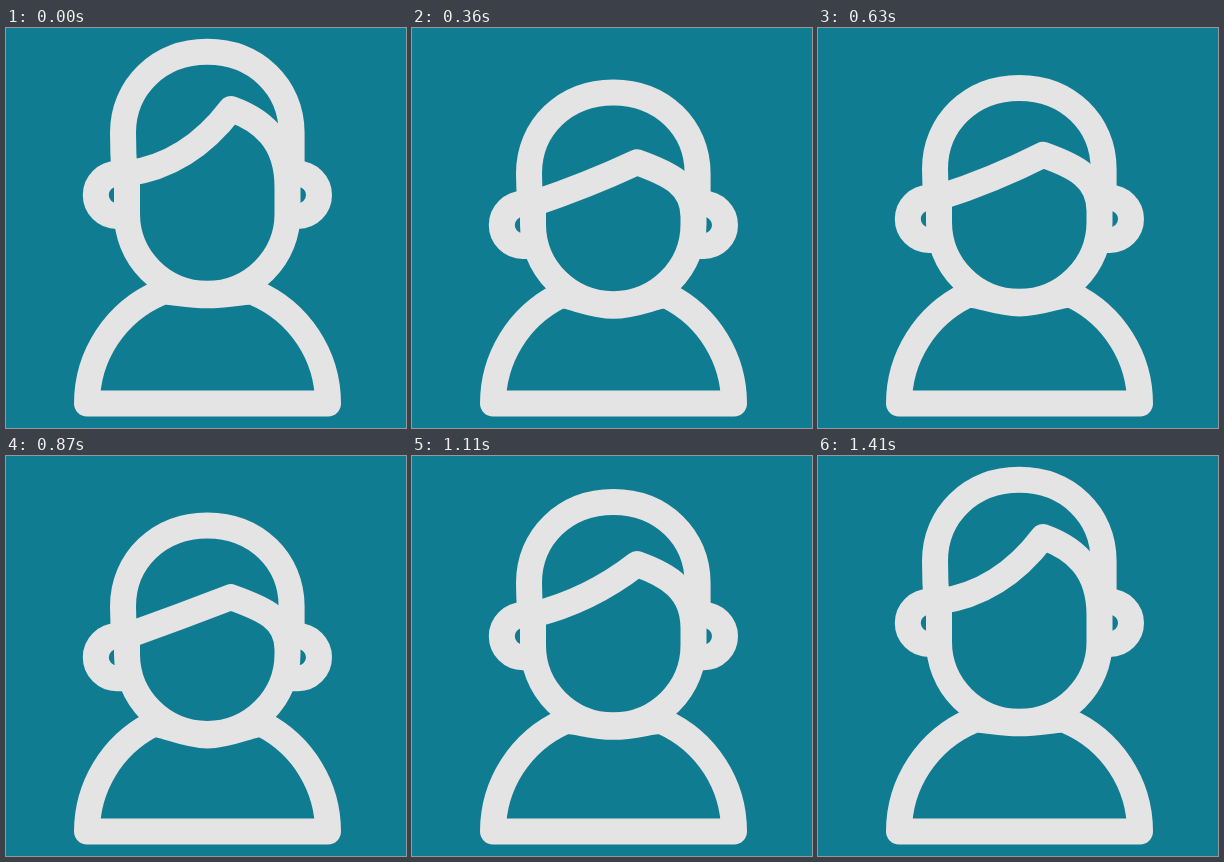
An HTML page that plays this animation: 400x400 px, repeating every 1560 ms.

```html
<!DOCTYPE html>
<html lang="en">
<head>
<meta charset="utf-8">
<title>Nodding avatar</title>
<style>
  html, body { margin: 0; width: 100%; height: 100%; overflow: hidden; background: #107c92; }
  svg { display: block; width: 100%; height: 100%; }
  path { fill: none; stroke: #e4e4e4; stroke-width: 26; stroke-linejoin: round; }
</style>
</head>
<body>
<svg viewBox="0 0 400 400">
  <path id="torso"/>
  <path id="ears"/>
  <path id="cap"/>
  <path id="face"/>
</svg>
<script>
const LOOP = 1560, STEP = 30;

// Heights of the stroke's centre line in the four head positions
const rest = { crown: 23.8, peak: 81, ear: 167, chin: 265.8 };
const back = { crown: 21, peak: 72.5, ear: 157.5, chin: 260 };
const nod  = { crown: 71, peak: 143.5, ear: 203, chin: 278.7 };
const half = { crown: 59, peak: 125.5, ear: 190, chin: 273.5 };

// Tilt back, nod twice, swing past rest and settle
const moves = [
  [0, rest], [165, back], [420, nod], [675, half],
  [930, nod], [1290, back], [1410, rest], [LOOP, rest]
];

const ease = u => (1 - Math.cos(Math.PI * u)) / 2;

function poseAt(t) {
  const i = moves.findIndex(([end]) => t < end);
  const [t0, from] = moves[i - 1], [t1, to] = moves[i];
  const u = ease((t - t0) / (t1 - t0));
  const pose = {};
  for (const k in from) pose[k] = from[k] + (to[k] - from[k]) * u;
  return pose;
}

const set = (id, d) => document.getElementById(id).setAttribute("d", d);

function draw(t) {
  const { crown, peak, ear, chin } = poseAt(t);
  const temple = ear - 21.5, side = crown + 81, jaw = chin - 80;

  // The fringe bows as the head lifts
  const bow = Math.max(0, temple - peak - 38) * 0.9;
  const right = ear - 8;
  set("face", `M121 ${temple}
    Q${173 + bow * 0.4} ${(temple + peak) / 2 + bow} 225 ${peak}
    C256 ${peak + 11} 281.5 ${peak + (right - peak) * 0.4} 281.5 ${right}
    V${jaw} A80.25 80 0 0 1 121 ${jaw} Z`);

  set("cap", `M118.5 ${temple} Q117 ${(temple + side) / 2} 117 ${side}
    C117 ${side - 46} 153 ${crown} 201.3 ${crown}
    S285.6 ${side - 46} 285.6 ${side} V${temple}`);

  set("ears", `M120 ${ear - 21} H110.8 a21 21 0 0 0 0 42 H120
    M283 ${ear - 21} H292 a21 21 0 0 1 0 42 H283`);

  // Round shoulders run into a neckline that follows the chin
  const mid = 201.5, base = 375.6, r = 120.5;
  const dx = 56.5 - (279 - chin) * 0.7;
  const dy = Math.sqrt(r * r - dx * dx);
  const y = base - dy, bend = y - 7 * dx / dy, dip = chin + 1.5;
  set("torso", `M${mid - r} ${base} A${r} ${r} 0 0 1 ${mid - dx} ${y}
    C${mid - dx + 7} ${bend} ${mid - 24} ${dip} ${mid} ${dip}
    S${mid + dx - 7} ${bend} ${mid + dx} ${y}
    A${r} ${r} 0 0 1 ${mid + r} ${base} Z`);
}

const start = performance.now();
function tick(now) {
  const t = Math.max(0, now - start) % LOOP;
  draw(Math.floor(t / STEP) * STEP);
  requestAnimationFrame(tick);
}
draw(0);
requestAnimationFrame(tick);
</script>
</body>
</html>
```
